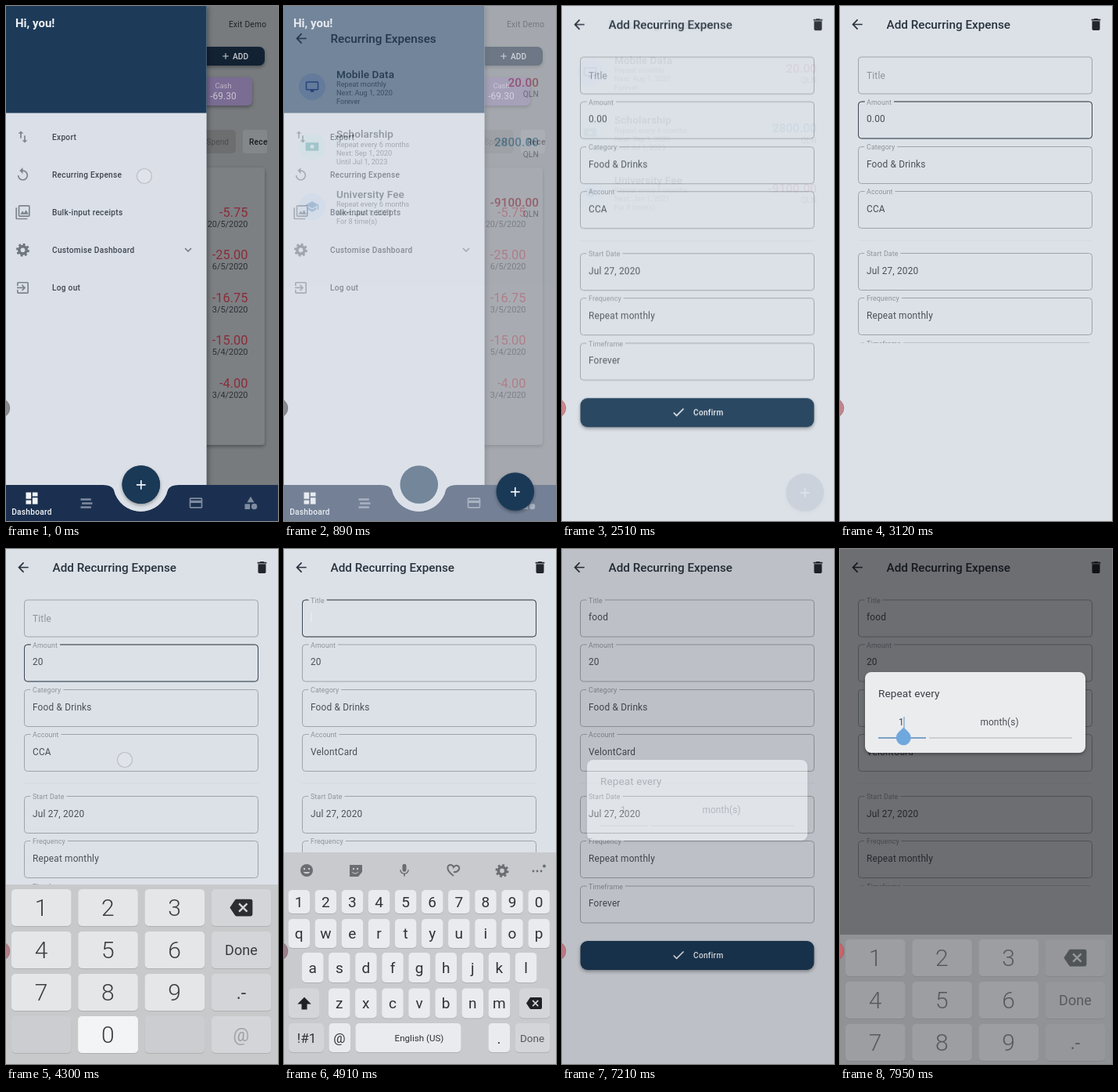
Animation of 348x657 px, one loop 8000 ms. Source, as an HTML page:

```html
<!DOCTYPE html>
<html lang="en">
<head>
<meta charset="utf-8">
<title>Recurring expense</title>
<style>
html, body { margin: 0; width: 100%; height: 100%; overflow: hidden; background: #dce1e8; }
svg { display: block; width: 100vw; height: 100vh; font-family: Roboto, sans-serif; }
.shadow { filter: drop-shadow(0 2px 2px rgba(0, 0, 0, .35)); }
.label { paint-order: stroke; stroke: #dce1e8; stroke-width: 7px; stroke-linejoin: round; }
</style>
</head>
<body>
<svg id="stage" viewBox="0 0 348 657"></svg>
<script>
const BG = '#dce1e8', NAVY = '#1c3a57', INK = '#29323d', BODY = '#4a5058', LOOP = 8000;
const STANDARD = 'cubic-bezier(.4,0,.2,1)', EASE_IN = 'cubic-bezier(.42,0,1,1)';
const ICONS = {
  back: 'M20 11H7.8l5.6-5.6L12 4l-8 8 8 8 1.4-1.4L7.8 13H20z',
  trash: 'M6 19c0 1.1.9 2 2 2h8c1.1 0 2-.9 2-2V7H6zM19 4h-3.5l-1-1h-5l-1 1H5v2h14z',
  add: 'M19 13h-6v6h-2v-6H5v-2h6V5h2v6h6z',
  check: 'M9 16.2L4.8 12l-1.4 1.4L9 19 21 7l-1.4-1.4z',
  grid: 'M3 13h8V3H3zm0 8h8v-6H3zm10 0h8V11h-8zm0-18v6h8V3z',
  replay: 'M12 5V1L7 6l5 5V7c3.3 0 6 2.7 6 6s-2.7 6-6 6-6-2.7-6-6H4c0 4.4 3.6 8 8 8s8-3.6 8-8-3.6-8-8-8z',
  swap: 'M16 17v-7h-2v7h-3l4 4 4-4zM9 3L5 7h3v7h2V7h3z',
  photos: 'M1 5h2v16h16v2H3q-2 0-2-2zM7 1h14q2 0 2 2v14q0 2-2 2H7q-2 0-2-2V3q0-2 2-2zm0 2v14h14V3zm1 12l3.5-5 2.5 3 3-4.5 4 6.5z',
  exit: 'M10 15.6l1.5 1.4 5-5-5-5L10 8.4 12.7 11H3v2h9.7zM19 3H5q-2 0-2 2v4h2V5h14v14H5v-4H3v4q0 2 2 2h14q2 0 2-2V5q0-2-2-2z',
  down: 'M16.6 8.6L12 13.2 7.4 8.6 6 10l6 6 6-6z',
  card: 'M20 4H4q-2 0-2 2v12q0 2 2 2h16q2 0 2-2V6q0-2-2-2zm0 14H4v-6h16zm0-10H4V6h16z',
  shapes: 'M12 2l-5.5 9h11zM3 13.5h8v8H3zM22 17.5a4.5 4.5 0 1 1-9 0 4.5 4.5 0 1 1 9 0z',
  lines: 'M3 5h16v3H3zM5 11h16v3H5zM3 17h16v3H3z',
  erase: 'M22 3H7q-1 0-1.6.9L0 12l5.4 8.1Q6 21 7 21h15q2 0 2-2V5q0-2-2-2zm-3 12.6L17.6 17 14 13.4 10.4 17 9 15.6 12.6 12 9 8.4 10.4 7 14 10.6 17.6 7 19 8.4 15.4 12z',
  shift: 'M12 3L2 13h6v8h8v-8h6z',
  mic: 'M12 14q3 0 3-3V5q0-3-3-3T9 5v6q0 3 3 3zm5.3-3c0 3-2.5 5.1-5.3 5.1S6.7 14 6.7 11H5c0 3.4 2.7 6.2 6 6.7V21h2v-3.3c3.3-.5 6-3.3 6-6.7z',
  screen: 'M21 3H3q-2 0-2 2v11q0 2 2 2h6v3h6v-3h6q2 0 2-2V5q0-2-2-2zm0 13H3V5h18z',
  cash: 'M1 5h22v14H1zm11 3.5a3.5 3.5 0 1 0 .1 0z',
  school: 'M5 13v4l7 4 7-4v-4l-7 4zM12 3L1 9l11 6 9-5v7h2V9z'
};

let css = '', count = 0;

// keys: [ms, declarations, easing to the next key]
const anim = (inner, ...keys) => {
  const name = 'k' + count++;
  const all = [[0, keys[0][1]], ...keys, [LOOP, keys[keys.length - 1][1]]];
  css += `@keyframes ${name}{${all.map(([t, decl, ease = 'linear']) =>
    `${t / LOOP * 100}%{${decl};animation-timing-function:${ease}}`).join('')}}`;
  return `<g style="animation:${name} ${LOOP}ms infinite">${inner}</g>`;
};
const tween = (inner, prop, t0, t1, from, to, ease) =>
  anim(inner, [t0, `${prop}:${from}`, ease], [t1, `${prop}:${to}`]);
const show = (t0, t1, inner) => {
  const keys = [[t0, 'opacity:1', 'step-end'], [t1, 'opacity:0', 'step-end']];
  if (t0 > 0) keys.unshift([0, 'opacity:0', 'step-end']);
  if (t1 >= LOOP) keys.pop();
  return anim(inner, ...keys);
};
const fadeUp = (inner, t) => tween(
  tween(inner, 'transform', t, t + 300, 'translateY(164px)', 'translateY(0)', STANDARD),
  'opacity', t, t + 300, 0, 1, EASE_IN);

const text = (x, y, str, size, fill, { w = 400, a = 'start', ls = 0, cls = '' } = {}) =>
  `<text x="${x}" y="${y + size * .36}" font-size="${size}" fill="${fill}" font-weight="${w}" text-anchor="${a}" letter-spacing="${ls}" class="${cls}">${str}</text>`;
const rect = (x, y, w, h, fill, r = 0, extra = '') =>
  `<rect x="${x}" y="${y}" width="${w}" height="${h}" rx="${r}" fill="${fill}" ${extra}/>`;
const disc = (x, y, r, fill, extra = '') => `<circle cx="${x}" cy="${y}" r="${r}" fill="${fill}" ${extra}/>`;
const line = (x1, x2, y, stroke, w = 1) => `<path d="M${x1} ${y}H${x2}" stroke="${stroke}" stroke-width="${w}"/>`;
const icon = (name, x, y, fill, size = 20) =>
  `<path transform="translate(${x - size / 2} ${y - size / 2}) scale(${size / 24})" fill="${fill}" fill-rule="evenodd" d="${ICONS[name]}"/>`;
const gear = (x, y, c) => disc(x, y, 4.7, 'none', `stroke="${c}" stroke-width="3.6"`) +
  disc(x, y, 7.2, 'none', `stroke="${c}" stroke-width="2.6" stroke-dasharray="2.827"`);
const touch = (x, y) => disc(x, y, 9.5, '#e1e4ea', 'stroke="#b4bac2" stroke-width="1.2" opacity=".9"');
// the page reaches above the stage so that it still covers it while sliding up
const page = () => rect(0, -170, 348, 827, BG);

const small = { w: 500, ls: .26 };

function dashboard() {
  const spend = [['-5.75', '20/5/2020'], ['-25.00', '6/5/2020'], ['-16.75', '3/5/2020'], ['-15.00', '5/4/2020'], ['-4.00', '3/4/2020']];
  const menu = [['swap', 'Export'], ['replay', 'Recurring Expense'], ['photos', 'Bulk-input receipts'], ['', 'Customise Dashboard'], ['exit', 'Log out']];
  return rect(0, 0, 348, 657, '#777b7e') +
    text(285, 23, 'Exit Demo', 10.16, '#1f2327', { ls: .26 }) +
    rect(240, 52, 91, 24, '#132233', 7, 'class="shadow"') +
    icon('add', 281, 64, '#c8ccd1', 13) + text(290, 64, 'ADD', 10.16, '#c8ccd1', { w: 500 }) +
    rect(240, 91, 75, 36, '#7a6c93', 6, 'class="shadow"') +
    text(278, 102, 'Cash', 9.3, '#bcb6c8', { a: 'middle' }) +
    text(278, 115, '-69.30', 11.86, '#c8c4d2', { a: 'middle', ls: .1 }) +
    rect(240, 158, 54, 30, '#6c6e70', 5) + text(285, 173, 'Spend', 10.16, '#4c4d50', { a: 'end' }) +
    rect(303, 158, 31, 30, '#83878a', 3) + text(311, 173, 'Rece', 10.16, '#181b1f', small) +
    rect(240, 206, 91, 354, '#7c8083', 4, 'class="shadow"') +
    spend.map(([sum, day], i) => text(309.5, 263 + i * 54.5, sum, 16.4, '#8c2b39', { a: 'end' }) +
      text(309.5, 278 + i * 54.5, day, 10.9, '#2c3034', { a: 'end' })).join('') +
    `<g style="filter:drop-shadow(2px 0 3px rgba(0,0,0,.35))">${rect(-8, 0, 264.6, 657, '#dbe0e8')}</g>` +
    rect(0, 0, 256.6, 136.5, '#1d3b59') + text(12, 22, 'Hi, you!', 15, '#eef1f5', { w: 700 }) +
    menu.map(([name, str], i) => {
      const y = 167 + i * 48.1;
      return (name ? icon(name, 21.5, y, '#7d848c') : gear(21.5, y, '#6f767e')) + text(59, y, str, 10.16, '#3f4650', small);
    }).join('') + icon('down', 233, 311, '#6f767e', 18) +
    `<path d="M0 611H124Q135 611 138 617A35.3 35.3 0 0 0 207 617Q210 611 221 611H348V657H0Z" fill="#1b3050"/>` +
    `<path d="M126 610.5Q135 611 138 617A35.3 35.3 0 0 0 207 617Q210 611 219 610.5" fill="${BG}"/>` +
    disc(172.8, 610.5, 24.3, NAVY) +
    icon('grid', 33, 628, '#f2f4f7') + text(33, 645, 'Dashboard', 10.16, '#f2f4f7', { ...small, a: 'middle' }) +
    icon('lines', 103, 634, '#7f8b9f') + icon('card', 243, 634, '#7f8b9f') + icon('shapes', 313, 634, '#7f8b9f');
}

const appBar = title => icon('back', 22, 23.5, INK) + text(59.5, 23.5, title, 15.25, INK, { w: 500 });

function expenseList() {
  const red = '#b23a4c';
  const rows = [
    ['Mobile Data', ['Repeat monthly', 'Next: Aug 1, 2020', 'Forever'], '20.00', red, 'screen', '#bccaec', '#34509c'],
    ['Scholarship', ['Repeat every 6 months', 'Next: Sep 1, 2020', 'Until Jul 1, 2023'], '2800.00', '#3a7ea6', 'cash', '#cbe1e3', '#5aa5a6'],
    ['University Fee', ['Repeat every 6 months', 'Next: Jan 1, 2021', 'For 8 time(s)'], '-9100.00', red, 'school', '#cad8ea', '#6590bd']
  ];
  return page() + appBar('Recurring Expenses') +
    rows.map(([title, notes, sum, color, pic, tint, mark], i) => {
      const y = 69 + i * 76.5;
      return disc(36, y + 16, 17, tint) + icon(pic, 36, y + 16, mark, 18) +
        text(67, y, title, 13.55, '#343d48', { w: 500, ls: .12 }) +
        notes.map((n, j) => text(67, y + 13 + j * 11, n, 9.2, '#5b636d')).join('') +
        text(326, y + 10.5, sum, 15.25, color, { a: 'end', w: 500, ls: .12 }) +
        text(326, y + 25.5, 'QLN', 10.16, '#555d67', { a: 'end', ls: .2 });
    }).join('');
}

const value = (y, str, fill = BODY) => text(34, y, str, 11.86, fill, { ls: .18 });
const box = (y, color) => rect(23.5, y + .5, 299, 47, 'none', 4, `stroke="${color}"`);
const label = (y, str) => text(34, y + 1, str, 8.9, '#8d939b', { ls: .1, cls: 'label' });
const field = (y, name, body) => box(y, '#9ea3a9') + label(y, name) + body;

function form() {
  const typed = 'food';
  const ends = [5260, 5330, 5400, LOOP];
  return page() + appBar('Add Recurring Expense') + icon('trash', 327.5, 23.5, '#22262b') +
    box(64.5, '#9ea3a9') +
    show(0, 4630, value(88.5, 'Title', '#8d939b')) +
    show(4630, 5810, box(64.5, '#3d4854')) +
    show(4630, LOOP, label(64.5, 'Title')) +
    show(4630, 5190, rect(34.5, 81, 1, 12, '#f0f3f7')) +
    ends.map((end, i) => show(5190 + i * 70, end, value(87, typed.slice(0, i + 1)))).join('') +
    box(121.5, '#9ea3a9') + show(3050, 4430, box(121.5, '#3d4854')) + label(121.5, 'Amount') +
    show(0, 3780, value(144, '0.00')) + show(3780, 4300, value(144, '2')) + show(4300, LOOP, value(144, '20')) +
    field(179, 'Category', value(201.5, 'Food &amp; Drinks')) +
    field(236, 'Account', show(0, 4430, value(258.5, 'CCA')) + show(4430, LOOP, value(258.5, 'VelontCard'))) +
    line(23, 323, 299, '#d3d8df') +
    field(315, 'Start Date', value(337.5, 'Jul 27, 2020')) +
    field(372, 'Frequency', value(394.5, 'Repeat monthly')) +
    field(429.5, 'Timeframe', value(452, 'Forever')) +
    rect(23.5, 500, 299, 37, NAVY, 9, 'class="shadow"') +
    icon('check', 149, 518, '#f2f4f7', 19) + text(168, 518, 'Confirm', 10.16, '#f2f4f7', small) +
    show(3100, 4430, rect(0, 430, 348, 227, BG)) +
    show(4660, 5900, rect(0, 388, 348, 269, BG)) +
    show(7810, LOOP, rect(0, 430, 348, 227, BG));
}

const cap = (x, y, w, h, fill, inner = '') => rect(x, y, w, h, fill, 5, 'style="filter:drop-shadow(0 1px 0 rgba(0,0,0,.12))"') + inner;

function numberPad() {
  const keys = ['1', '2', '3', 'erase', '4', '5', '6', 'Done', '7', '8', '9', '.-', '', '0', '', '@'];
  return rect(0, 428, 348, 300, '#c8c9cb') + keys.map((key, i) => {
    const col = i % 4, x = 7 + col * 85.3, y = 434 + (i >> 2) * 54;
    const digit = key !== '' && col < 3;
    const glyph = key === 'erase' ? icon(key, x + 38, y + 23.5, '#2b2d30', 29)
      : text(x + 38, y + 23.5, key, digit ? 30 : key === 'Done' ? 18 : 23, key === '@' ? '#a0a2a5' : '#3a3c3f', { a: 'middle', w: digit ? 300 : 400 });
    const lit = rect(x, y, 76.5, 47, '#f3f4f6', 5);
    return cap(x, y, 76.5, 47, digit ? '#e5e6e8' : key ? '#d4d5d8' : '#cccdd0') +
      (key === '2' ? show(3780, 3910, lit) : key === '0' ? show(4300, 4430, lit) : '') + glyph;
  }).join('');
}

function letterBoard() {
  const rows = [['1234567890', 19, 450, 30], ['qwertyuiop', 19, 490.5, 37], ['asdfghjkl', 36.5, 534, 38], ['zxcvbnm', 70.5, 579.5, 38]];
  const press = { f: [5190, 5260], o: [5260, 5400], d: [5400, 5470] };
  const grey = '#6a6d71', fn = '#d3d5d8', light = '#e9ebee', dark = '#303236', back = '#c8cacd';
  const tools = disc(29, 410, 8, grey) + disc(26, 408, 1.2, back) + disc(32, 408, 1.2, back) +
    `<path d="M24.5 412a5 4 0 0 0 9 0z" fill="${back}"/>` +
    `<path d="M84 403h16v9l-5 6h-11z" fill="${grey}"/><path d="M87 412q4 4 8 0" fill="none" stroke="${back}"/>` +
    disc(89, 408, 1.2, back) + disc(94, 408, 1.2, back) +
    icon('mic', 154, 410, grey) +
    `<path d="M217 417C206 409 209 403 213 403q3 0 4 3 2-3 5-2c5 2 1 9-5 8" fill="none" stroke="${grey}" stroke-width="2"/>` +
    gear(279, 410.5, grey) + [319, 324, 329].map(x => disc(x, 411, 1.4, grey)).join('') + disc(333, 404.5, 2, grey);
  const letters = rows.map(([set, x0, y, h]) => [...set].map((c, i) => {
    const x = x0 + i * 34.1 - 13.5;
    return cap(x, y - h / 2, 27.5, h, light) +
      (press[c] ? show(...press[c], rect(x, y - h / 2, 27.5, h, '#fff', 5)) : '') +
      text(x + 13.7, y, c, 19, dark, { a: 'middle' });
  }).join('')).join('');
  return rect(0, 387, 348, 400, back) + tools + letters +
    cap(6, 560.5, 39, 38, fn, icon('shift', 26, 579.5, '#1f2124', 21)) +
    cap(301, 560.5, 39, 38, fn, icon('erase', 320, 579.5, '#1f2124', 20)) +
    cap(6, 605, 45, 37, fn, text(29, 624, '!#1', 17, dark, { a: 'middle' })) +
    cap(57.5, 605, 27.5, 37, light, text(71, 624, '@', 17, dark, { a: 'middle' })) +
    cap(91.5, 605, 135, 37, light, text(173, 624, 'English (US)', 11.6, dark, { a: 'middle' })) +
    cap(261.5, 605, 27.5, 37, light, text(275, 624, '.', 19, dark, { a: 'middle' })) +
    cap(295.5, 605, 45, 37, fn, text(317.5, 624, 'Done', 13.5, '#55585c', { a: 'middle' }));
}

const place = (y, o) => `transform:translateY(${y}px);opacity:${o}`;
const rise = t => [[t, place(180, 0)], [t + 150, place(64, .4)], [t + 290, place(0, 1)]];

function dialog() {
  const cursor = rect(81.5, 214, 1, 14, '#5d92c4') +
    line(49, 110, 241, '#5e93c2', 1.5) +
    '<path d="M81.5 227.5L88 234A9.5 9.5 0 1 1 74.5 234Z" fill="#6ea8de"/>';
  const panel = rect(32, 157, 282, 103, '#ebecee', 8, 'class="shadow"') +
    text(49, 184, 'Repeat every', 13.55, '#3a3f46', { ls: .1 }) +
    text(75, 221, '1', 11.86, '#3f444b') + text(179.5, 221, 'month(s)', 11.86, '#4a4f56', { ls: .1 }) +
    line(49, 110, 241, '#b0b4b9') + line(114, 297, 241, '#b0b4b9') + show(7810, LOOP, cursor);
  return tween(rect(0, 0, 348, 657, 'rgba(0,0,0,.51)') +
    tween(panel, 'transform', 7780, 7910, 'translateY(112px)', 'translateY(0)', STANDARD),
    'opacity', 7180, 7290, 0, 1);
}

const fab = tween(disc(172.8, 610.5, 24.3, '#1a3957', 'class="shadow"') + icon('add', 172.8, 610.8, '#f4f6f8', 20),
  'transform', 705, 1005, 'translate(0,0)', 'translate(138px,10px)', STANDARD);
const padIn = rise(3130), padAgain = rise(7800).slice(0, 2);
const bubble = anim(disc(-7.5, 513, 12.5, 'currentColor', 'stroke="rgba(0,0,0,.15)"'),
  [0, 'color:#898b8f', 'step-end'], [1560, 'color:#c4898f'], [2510, 'color:#cc878d'], [4300, 'color:#b37f88'],
  [4910, 'color:#9b808a'], [6350, 'color:#b48c99'], [7950, 'color:#c9646a']);

document.getElementById('stage').innerHTML =
  dashboard() + fadeUp(expenseList(), 705) + fab + fadeUp(form(), 2226) + dialog() +
  anim(numberPad(), ...padIn, [4430, place(0, 1), 'step-end'], [4431, place(180, 0)], ...padAgain) +
  anim(letterBoard(), [4600, place(270, .3), STANDARD], [4890, place(0, 1)], [5790, place(0, 1), STANDARD], [6100, place(280, .3)]) +
  show(0, 610, touch(177, 217)) + show(4300, 4430, touch(152, 269)) + show(6150, 7210, touch(218, 386)) + bubble;
document.head.appendChild(document.createElement('style')).textContent = css;
</script>
</body>
</html>
```
